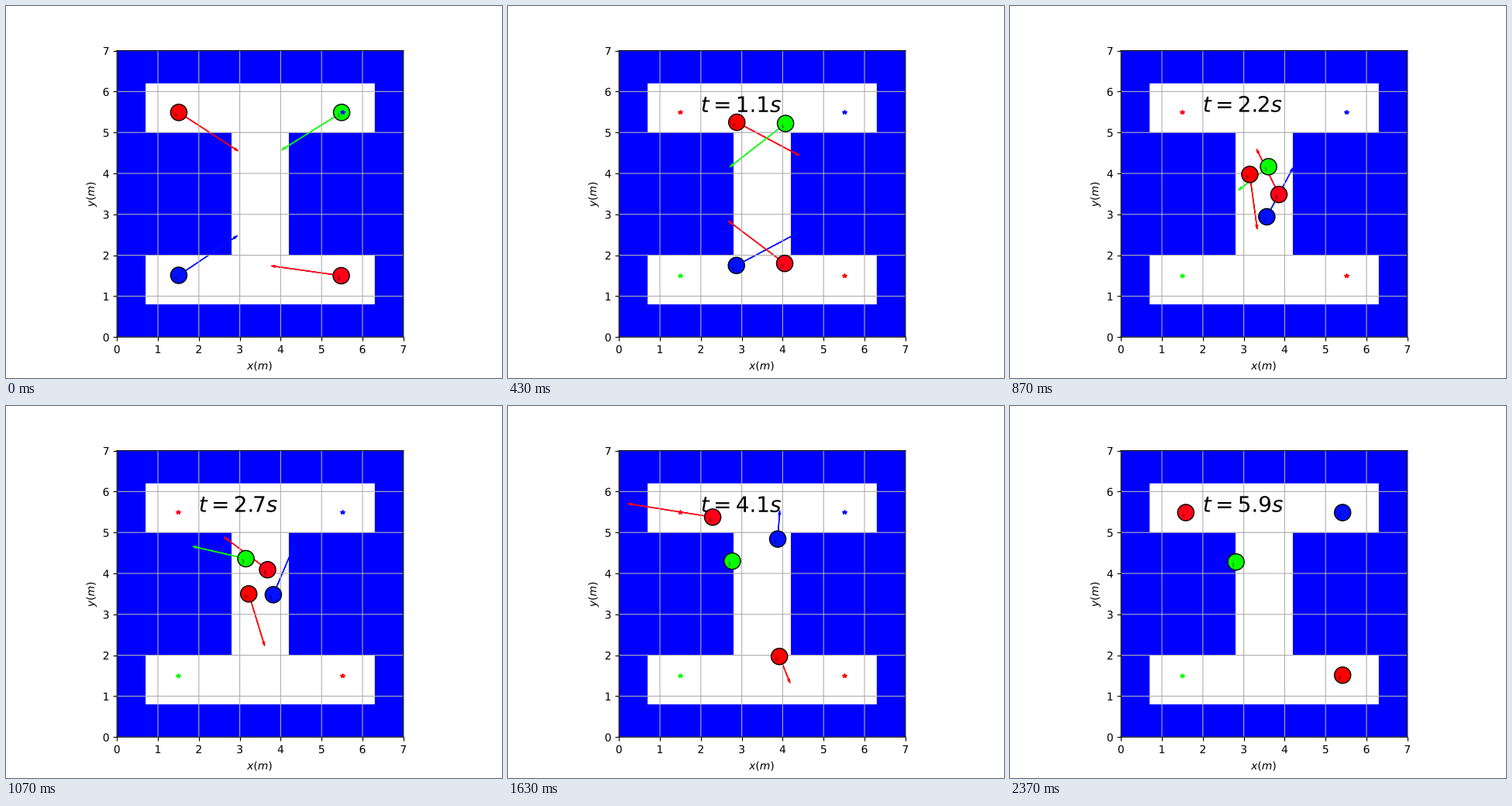
Animation, 640 px wide and 480 px high, one loop 2410 ms. Source, as a matplotlib script:

```python
import numpy as np
import matplotlib.pyplot as plt
from matplotlib.animation import FuncAnimation
from matplotlib.patches import Circle, Rectangle
from matplotlib.patheffects import Normal
from matplotlib.text import Text

STEPS = 60          # states, 0.1 s apart
TICK = 10           # ms per animation frame
LOOP = 2410         # ms
SPEED = 2.0         # speed on the last, clear stretch
RUN = 1.5           # length of that stretch
STOP = 0.085        # distance to the goal at rest
RADIUS = 0.2
HEAD = 0.1          # arrow head length

# All robots share these beats: full speed, squeeze through, hold at corners
BEATS = (0, 11, 17, 27, 41)
PACE = (1.63, 1.63, 1.3, 1.23, 0.6)

# 25 states per second shown on a 30 Hz clock, rounded to 10 ms
STARTS = np.round(np.round(1.2 * np.arange(STEPS)) * 10 / 3) * 10

# Subpixel placement for lines and shapes
plt.rcParams["path.snap"] = False


def polar(length, degrees):
    a = np.radians(degrees)
    return length * np.array([np.cos(a), np.sin(a)])


class Robot:
    """Glides through poses (x, y, heading), one per beat, then either runs
    straight to its goal or drifts to rest."""

    def __init__(self, goal, poses, arrive=None, heading=0, rest=()):
        self.goal, self.arrive = np.array(goal), arrive
        self.times, self.points, self.vels = [], [], []
        for step, pace, (x, y, angle) in zip(BEATS, PACE, poses):
            self.add(step, (x, y), polar(pace, angle))
        for step, x, y in rest:
            self.add(step, (x, y), (0, 0))
        if arrive:
            self.unit = polar(1, heading)
            self.free = arrive - 10 * RUN / SPEED
            self.add(self.free, self.goal - RUN * self.unit, SPEED * self.unit)
        self.points, self.vels = np.array(self.points), np.array(self.vels)

    def add(self, step, point, vel):
        self.times.append(step)
        self.points.append(point)
        self.vels.append(vel)

    def state(self, s):
        """Position and velocity at step s."""
        if self.arrive and s >= self.free:
            left = SPEED * (self.arrive - s) / 10
            vel = SPEED * self.unit if left > STOP else np.zeros(2)
            return self.goal - max(left, STOP) * self.unit, vel
        t, p, v = self.times, self.points, self.vels
        i = min(np.searchsorted(t, s, side="right"), len(t) - 1) - 1
        span = t[i + 1] - t[i]
        u = (s - t[i]) / span
        ease = u * u * (3 - 2 * u)
        bend = u * (1 - u) * ((1 - u) * v[i] - u * v[i + 1]) * span / 10
        pos = p[i] + ease * (p[i + 1] - p[i]) + bend
        return pos, (1 - u) * v[i] + u * v[i + 1]


robots = [
    Robot((5.5, 1.5),
          [(1.51, 5.49, -33), (2.88, 5.25, -28), (3.17, 4.48, -91),
           (3.22, 3.5, -73), (3.92, 1.97, -68)],
          arrive=50.6, heading=-9),
    Robot((1.5, 1.5),
          [(5.49, 5.49, -148), (4.07, 5.22, -142), (3.79, 4.36, -95),
           (3.15, 4.36, 167)],
          rest=[(41, 2.77, 4.3), (59, 2.81, 4.28)]),
    Robot((5.5, 5.5),
          [(1.51, 1.51, 34), (2.87, 1.75, 28), (3.25, 2.41, 57),
           (3.82, 3.48, 67), (3.88, 4.84, 86)],
          arrive=53.8, heading=9),
    Robot((1.5, 5.5),
          [(5.48, 1.5, 172), (4.05, 1.8, 143), (3.8, 2.74, 91),
           (3.68, 4.09, 143)],
          arrive=45, heading=171),
]

fig = plt.figure(figsize=(6.4, 4.8), dpi=100)
ax = fig.add_subplot()


def block(x0, y0, x1, y1, color):
    ax.add_patch(Rectangle((x0, y0), x1 - x0, y1 - y0, facecolor=color))


# Solid walls with an I-shaped room
block(0, 0, 7, 7, "blue")
block(0.7, 0.8, 6.3, 2, "white")
block(0.7, 5, 6.3, 6.2, "white")
block(2.8, 2, 4.2, 5, "white")

hsv = plt.get_cmap("hsv")
parts = []
for n, bot in enumerate(robots):
    color = hsv(n / 3)
    (x, y), (dx, dy) = bot.state(0)
    disc = ax.add_patch(Circle((x, y), RADIUS, facecolor=color,
                               edgecolor="black", linewidth=1, zorder=2))
    arrow = ax.arrow(x, y, dx, dy, head_width=0.05, head_length=HEAD,
                     fc=color, ec=color)
    label = ax.text(x, y, str(n), fontsize=4, zorder=2)
    ax.plot(*bot.goal, "*", color=color, markersize=4)
    parts.append((bot, disc, arrow, label))

clock = ax.text(2, 5.5, "", fontsize=20)
ax.set_aspect("equal")
ax.set(xlim=(0, 7), ylim=(0, 7), xticks=range(8), yticks=range(8),
       xlabel="$x (m)$", ylabel="$y (m)$")
ax.grid(True)

# Draw text as unhinted outlines
for text in fig.findobj(Text):
    text.set_path_effects([Normal()])


def update(frame):
    s = int(np.searchsorted(STARTS, frame * TICK, side="right")) - 1
    for bot, disc, arrow, label in parts:
        pos, vel = bot.state(s)
        disc.center = tuple(pos)
        label.set_position(pos - 0.1)
        moving = bool(np.hypot(*vel) > 0.01)
        arrow.set_visible(moving)
        if moving:
            arrow.set_data(x=pos[0], y=pos[1], dx=vel[0], dy=vel[1])
    clock.set_text(f"$t={s / 10:.1f} s$" if s else "")
    return []


anim = FuncAnimation(fig, update, frames=LOOP // TICK, interval=TICK,
                     repeat=True, repeat_delay=0, blit=False)
plt.show()
```
